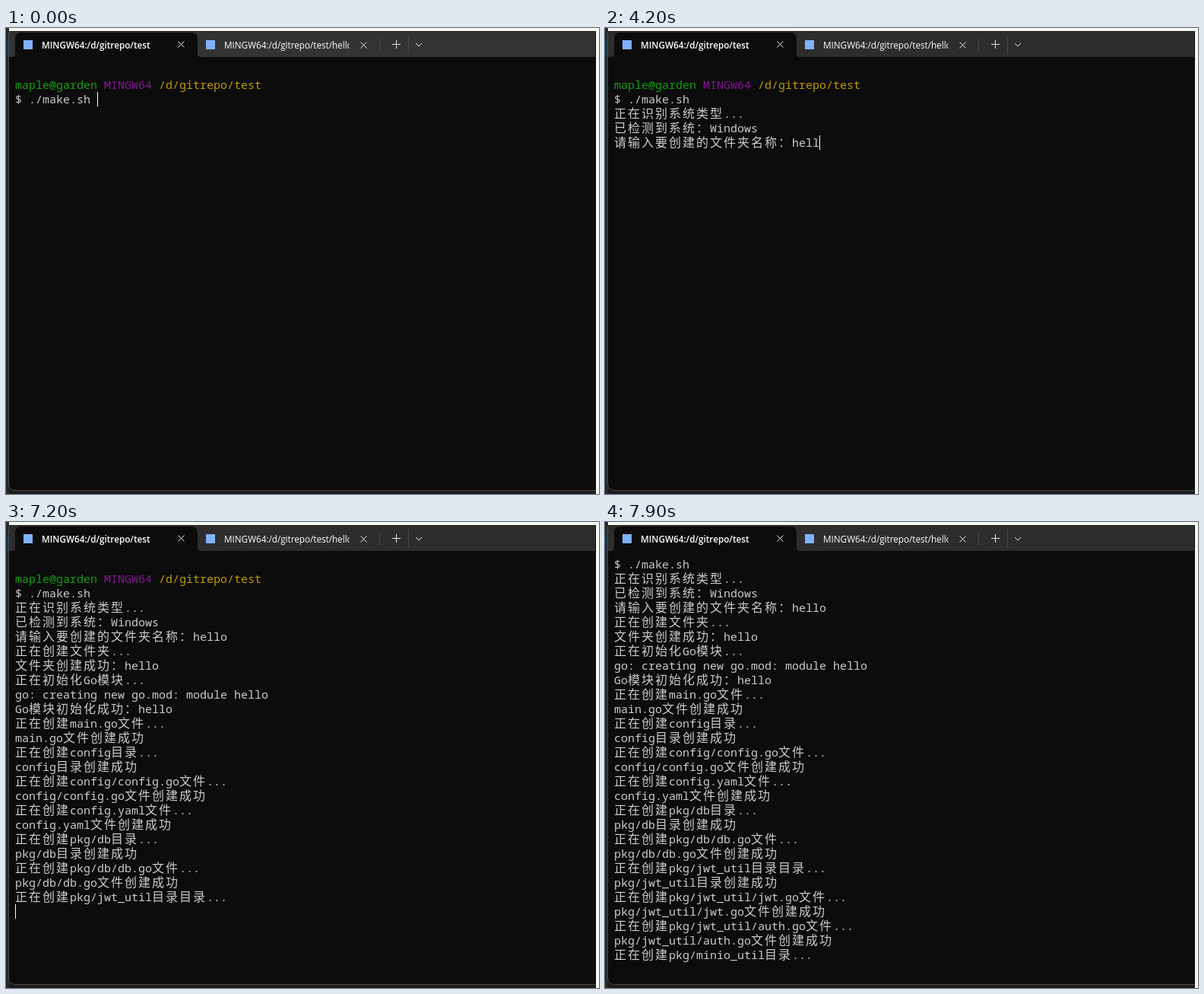
An HTML page that plays this animation: 780x612 px, repeating every 8000 ms.

```html
<!DOCTYPE html>
<html lang="zh-CN">
<head>
<meta charset="utf-8">
<style>
  html, body { margin: 0; width: 780px; height: 612px; overflow: hidden; background: #0c0c0c; }
  svg { position: absolute; left: 0; top: 0; }
  svg text { font: 11.7px "Open Sans", "Noto Sans", sans-serif; fill: #fff; }
  svg .active { font-weight: 600; }
  .icon { fill: none; stroke: #e8e8e8; }
  #screen { position: absolute; left: 12px; top: 46px; width: 760px; height: 551px; overflow: hidden; }
  #lines { position: relative; color: #ccc; font: 500 15px/19px "Noto Sans Mono", monospace; }
  #lines div { height: 19px; white-space: pre; }
  i { font: 400 16px/0 "Noto Sans CJK SC", "Noto Sans CJK", sans-serif; letter-spacing: 2px; }
  #cursor { position: absolute; width: 1px; height: 19px; background: #fff; }
</style>
</head>
<body>
<svg width="780" height="612">
  <path d="M0 0H4V612H0Z" fill="#26282a"/>
  <path d="M0 14H3V37H0Z" fill="#17324a"/>
  <path d="M4 0H780V612H776V4H4Z" fill="#f4f8ee"/>
  <path d="M4 600Q4 608 13 608H776V612H4Z" fill="#1c1c1c"/>
  <path d="M3.5 5V598Q3.5 607.5 13 607.5H776" fill="none" stroke="#4c4c4c"/>
  <path id="bar" d="M4 5H775V38H4Z"/>
  <path d="M4 4.5H776" stroke="#1c1c1c"/>
  <path d="M8 38Q12 38 12 34V14Q12 6 20 6H244Q252 6 252 14V34Q252 38 256 38Z" fill="#0c0c0c"/>
  <rect x="23" y="16" width="12" height="12" fill="#80b3ff"/>
  <rect x="263" y="16" width="12" height="12" fill="#80b3ff"/>
  <clipPath id="tabClip"><path d="M287 8H451.5V36H287Z"/></clipPath>
  <text class="active" x="47" y="27">MINGW64:/d/gitrepo/test</text>
  <g clip-path="url(#tabClip)"><text x="287" y="27">MINGW64:/d/gitrepo/test/hello</text></g>
  <path class="icon" d="M226.5 17.5l8 8m0-8l-8 8M466.5 18.5l8 8m0-8l-8 8M508 21.5h11m-5.5-5.5v11M539 20l4 4 4-4"/>
  <path d="M491.5 13V31M529.5 10V34" stroke="#484848"/>
</svg>
<div id="screen"><div id="lines"></div><div id="cursor"></div></div>
<script>
const LOOP = 8000, ROW = 19, COL = 9, LAST_ROW = 28, INPUT_ROW = 5;
const $ = id => document.getElementById(id);
const paint = (color, text) => `<span style="color:${color}">${text}</span>`;
const create = (path, kind) => [`正在创建${path}${kind}...`, `${path}${kind}创建成功`];

const text = [
  '',
  `${paint('#13a10e', 'maple@garden')} ${paint('#881798', 'MINGW64')} ${paint('#c19c00', '/d/gitrepo/test')}`,
  '$ ./make.sh',
  '正在识别系统类型...',
  '已检测到系统：Windows',
  '请输入要创建的文件夹名称：<span id="typed"></span>',
  '正在创建文件夹...',
  '文件夹创建成功：hello',
  '正在初始化Go模块...',
  'go: creating new go.mod: module hello',
  'Go模块初始化成功：hello',
  ...create('main.go', '文件'),
  ...create('config', '目录'),
  ...create('config/config.go', '文件'),
  ...create('config.yaml', '文件'),
  ...create('pkg/db', '目录'),
  ...create('pkg/db/db.go', '文件'),
  '正在创建pkg/jwt_util目录目录...',
  'pkg/jwt_util目录创建成功',
  ...create('pkg/jwt_util/jwt.go', '文件'),
  ...create('pkg/jwt_util/auth.go', '文件'),
  '正在创建pkg/minio_util目录...'
];
$('lines').innerHTML = text
  .map(line => `<div>${line.replace(/[^\x00-\x7f]+/g, '<i>$&</i>')}</div>`).join('');
const rows = [...$('lines').children];

// [time, cursor row]: every row above the cursor has been printed
const output = [[0, 2], [2400, 3], [2600, 5], [5300, 7], [5500, 8], [5600, 9], [5800, 11],
  [5900, 12], [6000, 14], [6200, 15], [6300, 16], [6500, 18], [6700, 20], [6900, 22],
  [7100, 23], [7200, 24], [7300, 25], [7400, 26], [7600, 28], [7800, 29], [7900, 30]];
const keys = [3600, 3800, 4100, 4200, 4500];
const cursorOff = [[1200, 1700], [2200, 2400], [2900, 3400], [5000, 5300], [7900, LOOP]];

function draw(t) {
  const row = output.filter(([at]) => at <= t).pop()[1];
  const typed = keys.filter(at => at <= t).length;
  const scroll = Math.max(0, row - LAST_ROW);
  const col = row === 2 ? 12 : row === INPUT_ROW ? 26 + typed : 0;

  rows.forEach((el, i) => {
    const shown = i < row || i === 2 || (i === INPUT_ROW && row === INPUT_ROW);
    el.style.visibility = shown ? 'visible' : 'hidden';
  });
  $('typed').textContent = 'hello'.slice(0, typed);
  $('lines').style.top = -scroll * ROW + 'px';
  $('cursor').style.left = col * COL + 'px';
  $('cursor').style.top = (row - scroll) * ROW + 'px';
  $('cursor').style.opacity = cursorOff.some(([from, to]) => t >= from && t < to) ? 0 : 1;
  $('bar').setAttribute('fill', t < 700 ? '#333333' : '#2d2d2d');
}

const start = performance.now();
function tick() {
  draw((performance.now() - start) % LOOP);
  requestAnimationFrame(tick);
}
tick();
</script>
</body>
</html>
```
